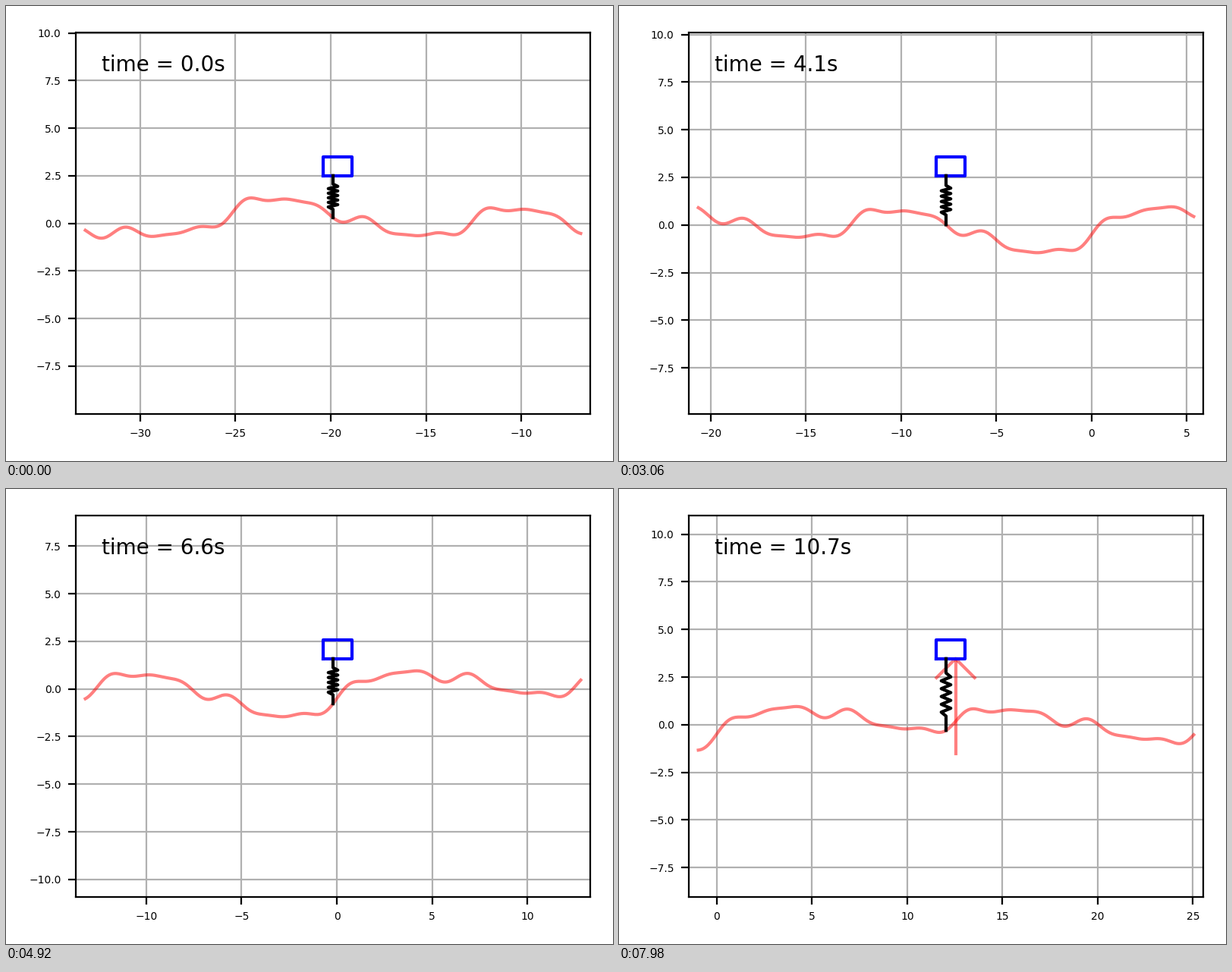
A matplotlib script for the animation above (8 s loop, 800 px wide and 600 px high).

```python
import numpy as np
import matplotlib.pyplot as plt
from matplotlib.animation import FuncAnimation
from matplotlib.ticker import MultipleLocator

FRAMES = 134
LOOP_MS = 8000
T0, DT = 0.04, 0.08          # simulated seconds: first picture, step
SPEED, START = 3.0, -20.0
REST = 2.5                   # spring length at rest
STIFF, DAMP = 64.0, 19.2     # per unit mass
PUSH = 174.0
PUSHES = ((4.57, 4.80, -1), (10.45, 10.70, 1))   # begin, end, direction
SUBSTEPS = 40


def road(x):
    return (0.5 * np.sin(0.2 * (x - 3)) + 0.3 * np.sin(0.4 * (x - 2))
            + 0.7 * np.sin(0.5 * x) + 0.2 * np.sin(x)
            + 0.2 * np.sin(2 * x) + 0.1 * np.sin(3 * x))


def position(t):
    return START + SPEED * t


def push_sign(t):
    return sum(sign for a, b, sign in PUSHES if a <= t < b)


def simulate():
    """Height of the body's underside at every picture."""
    h = DT / SUBSTEPS
    y, v, t = 2.505, 0.0, T0
    heights = []
    for _ in range(FRAMES):
        heights.append(y)
        for _ in range(SUBSTEPS):
            x = position(t)
            slope = (road(x + 1e-4) - road(x - 1e-4)) / 2e-4
            acc = -STIFF * (y - REST - road(x)) - DAMP * (v - SPEED * slope)
            v += (acc + PUSH * push_sign(t)) * h
            y += v * h
            t += h
    return heights


def spring(x, low, high):
    """Straight ends with a zigzag over the middle 60 percent."""
    side = np.zeros(14)
    side[2:12] = 0.25 * (-1.0) ** np.arange(1, 11)
    part = np.concatenate(([0], np.linspace(0.2, 0.8, 12), [1]))
    return x + side, low + part * (high - low)


heights = simulate()

fig = plt.figure(figsize=(4, 3), dpi=200, facecolor="white")
left, right, top, bottom = 92 / 800, 770 / 800, 564.6 / 600, 62.4 / 600
ax = fig.add_axes([left, bottom, right - left, top - bottom])
ax.xaxis.set_major_locator(MultipleLocator(5))
ax.yaxis.set_major_locator(MultipleLocator(2.5))
ax.tick_params(labelsize=5)
ax.grid(True)

soft_red = dict(color="red", alpha=0.5, lw=1.5)
road_line, = ax.plot([], [], **soft_red)
arrow_shaft, = ax.plot([], [], **soft_red)
arrow_head, = ax.plot([], [], **soft_red)
body_line, = ax.plot([], [], color="blue", lw=1.5)
spring_line, = ax.plot([], [], color="black", lw=1.5)
label = ax.text(0.05, 0.9, "", transform=ax.transAxes, fontsize=10)


def draw_arrow(x, y, sign):
    """Arrow touching the body from the side the push comes from."""
    tip = y if sign >= 0 else y + 1
    arrow_shaft.set_data([x, x], [tip - 5 * sign, tip])
    arrow_head.set_data([x - 1, x, x + 1], [tip - sign, tip, tip - sign])
    for part in (arrow_shaft, arrow_head):
        part.set_visible(sign != 0)


def draw(i):
    t = T0 + DT * i
    x, y = position(t), heights[i]

    xs = np.linspace(x - 13, x + 13, 400)
    road_line.set_data(xs, road(xs))
    spring_line.set_data(*spring(x, road(x), y))
    a, b = x - 0.5, x + 1.0
    body_line.set_data([a, b, b, a, a], [y, y, y + 1, y + 1, y])
    draw_arrow(x + 0.5, y, push_sign(t))

    label.set_text(f"time = {t:.1f}s")
    ax.set_xlim(x - 13.5, x + 13.5)
    ax.set_ylim(y - 12.5, y + 7.5)
    return road_line, arrow_shaft, arrow_head, body_line, spring_line, label


anim = FuncAnimation(fig, draw, frames=FRAMES, init_func=lambda: draw(0),
                     interval=LOOP_MS / FRAMES, repeat=True, repeat_delay=0,
                     blit=False)
plt.show()
```
